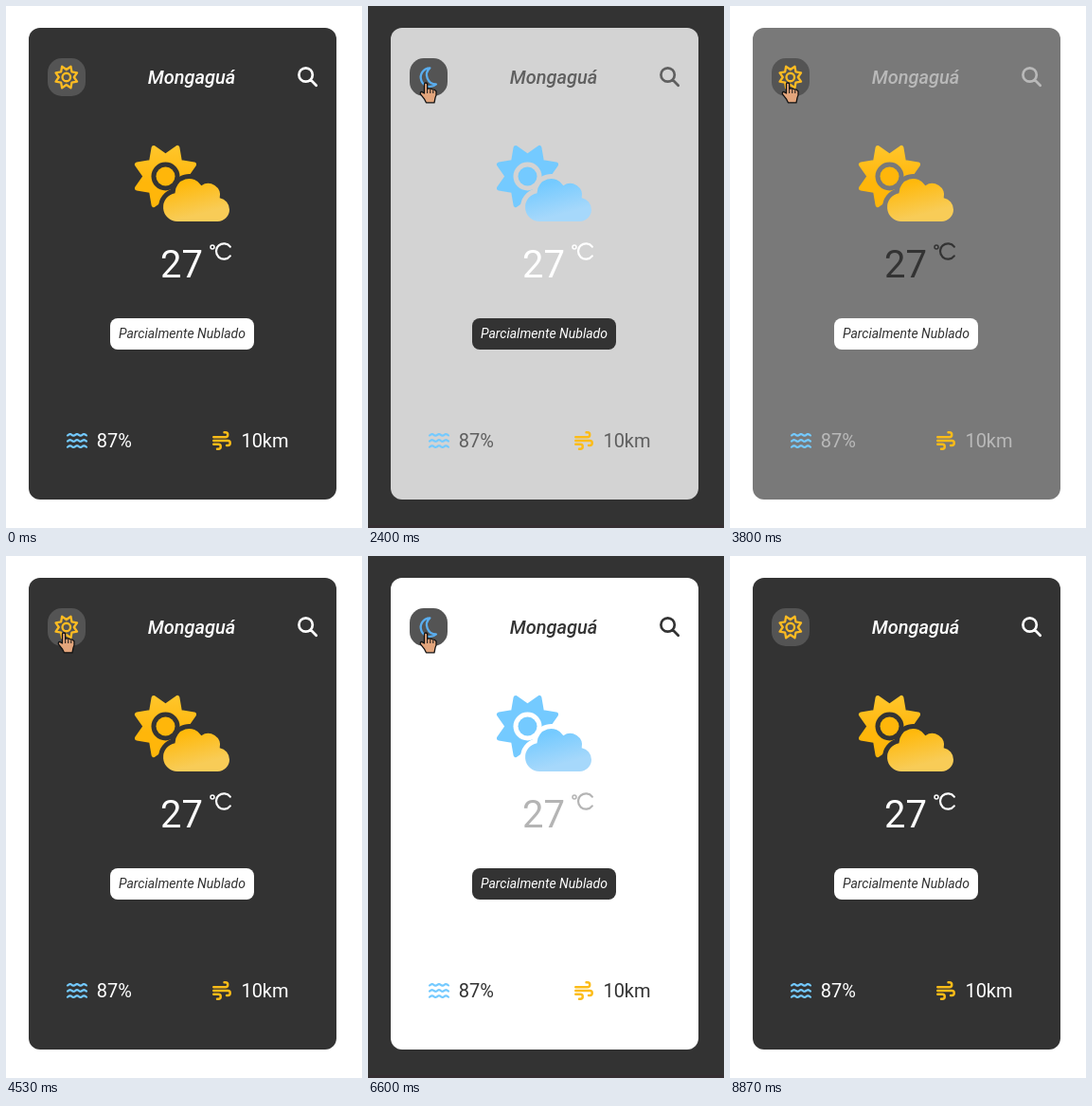
An HTML page that plays this animation: 376x550 px, repeating every 9390 ms.

```html
<!DOCTYPE html>
<html lang="pt">
<head>
<meta charset="utf-8">
<style>
html, body { margin: 0; width: 100%; height: 100%; overflow: hidden; }
svg { display: block; width: 376px; height: 550px; font-family: Roboto, sans-serif;
  --page: #fff; --pill: #fff; --pillText: #333;
  --sunA: #ffc52a; --sunB: #ffb60a; --cloudA: #ffb90c; --cloudB: #f8cc57; }
svg.light { --page: #333; --pill: #333; --pillText: #fff;
  --sunA: #74caff; --sunB: #74caff; --cloudA: #74caff; --cloudB: #a6d8fb; }
.line { fill: none; stroke-linecap: round; stroke-linejoin: round; }
.ink { fill: var(--ink); }
.light .day, .night { display: none; }
.light .night { display: inline; }
</style>
</head>
<body>
<svg id="app" viewBox="0 0 376 550">
  <defs>
    <linearGradient id="sunFill" x1="0" y1="0" x2="0" y2="1">
      <stop offset="0" style="stop-color:var(--sunA)"/>
      <stop offset=".6" style="stop-color:var(--sunB)"/>
    </linearGradient>
    <linearGradient id="cloudFill" x1=".3" y1="0" x2=".7" y2="1">
      <stop offset=".1" style="stop-color:var(--cloudA)"/>
      <stop offset=".8" style="stop-color:var(--cloudB)"/>
    </linearGradient>
    <path id="cloud" d="M640 432a80 80 0 0 1-80 80H288a96 96 0 0 1-16-190.6V320a96 96 0 0 1 178.2-49.6A80 80 0 0 1 574.1 353.2A80 80 0 0 1 640 432z"/>
    <mask id="gap" maskUnits="userSpaceOnUse" x="-20" y="-20" width="680" height="560">
      <rect x="-20" y="-20" width="680" height="560" fill="#fff"/>
      <circle cx="208" cy="208" r="96"/>
      <use href="#cloud" stroke="#000" stroke-width="64"/>
    </mask>
  </defs>

  <rect width="376" height="550" style="fill:var(--page)"/>
  <rect class="night" y="547" width="376" height="3" fill="#352f32"/>
  <rect x="24" y="23" width="325" height="497" rx="12" style="fill:var(--card)"/>

  <rect x="44" y="55" width="40" height="40" rx="15" fill="#545454"/>
  <g class="day line" transform="translate(63.8 75) scale(.0485)" stroke="#fdbb22" stroke-width="48">
    <path id="smallStar"/>
    <circle r="88"/>
  </g>
  <path class="night line" transform="translate(54.4 62.6) scale(.0488)" stroke="#5aaef0" stroke-width="48"
    d="M224 56A200 200 0 1 0 359 406A200 200 0 0 1 224 56z"/>

  <text class="ink" x="196" y="82" text-anchor="middle" font-size="20" font-weight="500" font-style="italic">Mongaguá</text>
  <path class="line" style="stroke:var(--ink)" stroke-width="2.7"
    d="M323.8 72.5a7.2 7.2 0 1 0-14.4 0a7.2 7.2 0 1 0 14.4 0M321.8 77.8l5.9 5.9"/>

  <g transform="translate(136 147) scale(.15625)">
    <g mask="url(#gap)">
      <path id="bigStar" transform="translate(208 208)" fill="url(#sunFill)" stroke="url(#sunFill)" stroke-width="32" stroke-linejoin="round"/>
    </g>
    <circle cx="208" cy="208" r="64" style="fill:var(--sunB)"/>
    <use href="#cloud" fill="url(#cloudFill)"/>
  </g>

  <text x="163" y="286" font-size="40" style="fill:var(--temp)">27</text>
  <g class="line" style="stroke:var(--temp)">
    <circle cx="218" cy="254" r="2" stroke-width="1.5"/>
    <path stroke-width="2.2" d="M236.8 253.6a8.2 8.2 0 1 0 0 9.8"/>
  </g>

  <rect x="110" y="329" width="152" height="33" rx="8" style="fill:var(--pill)"/>
  <text x="186" y="350" text-anchor="middle" font-size="14" font-style="italic" style="fill:var(--pillText)">Parcialmente Nublado</text>

  <path id="water" class="line" stroke="#74caff" stroke-width="2.2"/>
  <text class="ink" x="95.7" y="465" font-size="20">87%</text>
  <path class="line" transform="translate(218 448) scale(.0391)" stroke="#fcbc18" stroke-width="62"
    d="M320 32h32a64 64 0 0 1 0 128H32M32 256h384a64 64 0 0 1 0 128h-32M32 352h128a64 64 0 0 1 0 128h-32"/>
  <text class="ink" x="248.4" y="465" font-size="20">10km</text>

  <g id="cursor" fill="#e3a57c" stroke="#111" stroke-width="1.3" stroke-linejoin="round">
    <path id="arrow" d="M.6.6v13.6l3.3-3 2.6 5.4 2.6-1.2-2.5-5.2h4.8z"/>
    <g id="hand">
      <path d="M-1.5 11V1.5Q-1.5 0 .1 0t1.6 1.5V6q4-.6 5 .6 3 0 4.3 2.2.5 4-1 7l-1 5H.4l-2-4-4-5q-.5-2.2 1.4-2.4z"/>
      <path d="M1.7 6v5M4.8 6.4V11M7.8 7.4V11" stroke-width="1"/>
    </g>
  </g>
</svg>
<script>
const LOOP = 9390, FADE = 500, INHERIT_LAG = 480;
const toggles = [2160, 3610, 6005, 7935];
// Pointer keys: time, x, y
const route = [[1525, 62, 38], [1730, 66, 88], [1840, 66, 88], [2000, 61, 81],
               [8470, 61, 81], [8670, 62, 36]];
const $ = id => document.getElementById(id);
const clamp = v => Math.min(1, Math.max(0, v));

// Eight-pointed star around the origin
function star(tip, valley) {
  const points = Array.from({ length: 16 }, (_, i) => {
    const a = i * Math.PI / 8, r = i % 2 ? tip : valley;
    return `${r * Math.cos(a)} ${r * Math.sin(a)}`;
  });
  return `M${points.join('L')}z`;
}

function wave(y) {
  const points = [];
  for (let x = 65; x <= 85; x += .5)
    points.push(`${x} ${y - .8 * Math.cos((x - 67.7) * Math.PI / 3.66)}`);
  return 'M' + points.join('L');
}

// CSS "ease": cubic-bezier(.25, .1, .25, 1)
function ease(p) {
  const bez = (a, b, s) => 3 * a * s * (1 - s) ** 2 + 3 * b * s * s * (1 - s) + s ** 3;
  let lo = 0, hi = 1;
  for (let i = 0; i < 20; i++) {
    const mid = (lo + hi) / 2;
    if (bez(.25, .25, mid) < p) lo = mid; else hi = mid;
  }
  return bez(.1, 1, hi);
}

function grey(light) {
  const v = Math.round(51 + 204 * light);
  return `rgb(${v},${v},${v})`;
}

function drawPointer(t) {
  const i = route.findIndex(k => k[0] > t);
  $('cursor').style.display = i > 0 ? '' : 'none';
  if (i < 1) return;
  const [t0, x0, y0] = route[i - 1], [t1, x1, y1] = route[i];
  const p = (t - t0) / (t1 - t0), x = x0 + (x1 - x0) * p, y = y0 + (y1 - y0) * p;
  $('cursor').setAttribute('transform', `translate(${x} ${y})`);
  $('arrow').style.display = y < 56 ? '' : 'none';
  $('hand').style.display = y < 56 ? 'none' : '';
}

function draw(t) {
  const done = toggles.filter(k => k <= t), light = done.length % 2 === 1;
  const since = done.length ? t - done[done.length - 1] : LOOP;
  const lightness = lag => {
    const p = ease(clamp((since - lag) / FADE));
    return light ? p : 1 - p;
  };
  const app = $('app'), main = lightness(0);
  app.classList.toggle('light', light);
  app.style.setProperty('--card', grey(main));
  app.style.setProperty('--ink', grey(1 - main));
  app.style.setProperty('--temp', grey(1 - lightness(INHERIT_LAG)));
  drawPointer(t);
}

$('smallStar').setAttribute('d', star(251, 165));
$('bigStar').setAttribute('d', star(208, 136));
$('water').setAttribute('d', [451.9, 458, 464.1].map(wave).join(''));

const start = performance.now();
function tick() {
  draw((performance.now() - start) % LOOP);
  requestAnimationFrame(tick);
}
tick();
</script>
</body>
</html>
```
